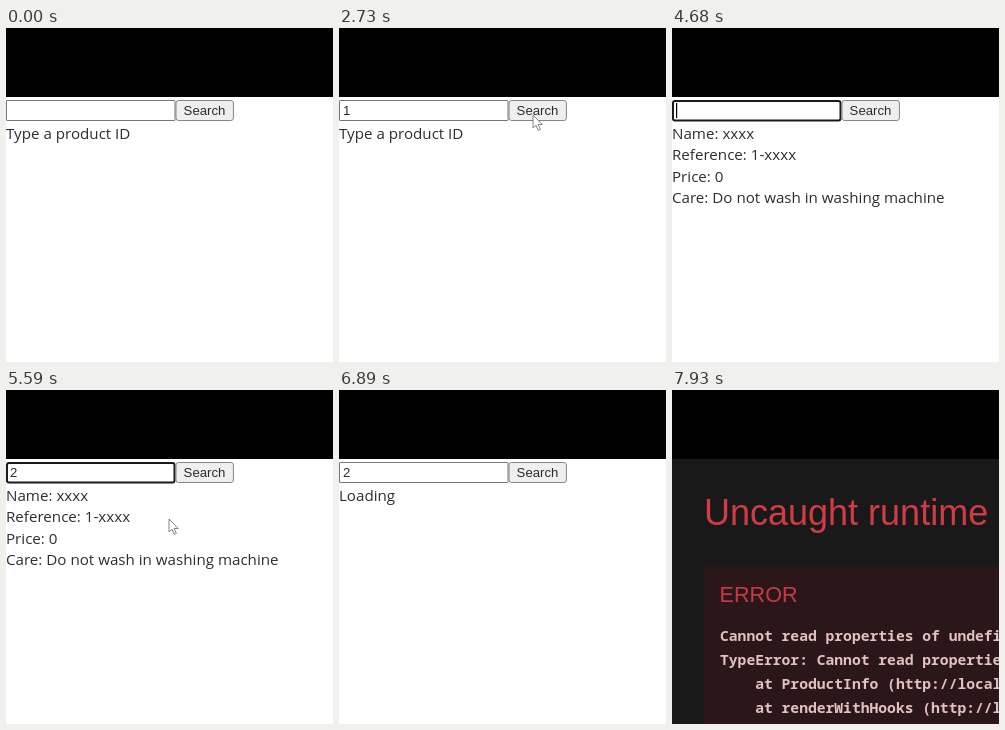
Animation of 327 by 334 pixels, one loop 8000 ms. Source, as an HTML page:

```html
<!DOCTYPE html>
<html lang="en">
<head>
<meta charset="utf-8">
<title>Product search</title>
<style>
  html, body { margin: 0; width: 100%; height: 100%; overflow: hidden; background: #fff; }
  svg { display: block; width: 327px; height: 334px; }
  text { white-space: pre; }
  .body { font: 15.15px "Open Sans", "Noto Sans", sans-serif; fill: #2b2f33; }
  .ui { font: 13.2px "Liberation Sans", Arial, sans-serif; fill: #2c2c2c; }
  .title { font: 36px "Liberation Sans", Arial, sans-serif; fill: #d03c45; }
  .sub { font: 21.6px "Liberation Sans", Arial, sans-serif; fill: #c83a43; }
  .mono { font: 600 14.66px "Noto Sans Mono", "DejaVu Sans Mono", monospace; fill: #e6c0c0; }
</style>
</head>
<body>
<svg viewBox="0 0 327 334">
  <rect width="327" height="334" fill="#fff"/>
  <rect width="327" height="69" fill="#000"/>

  <g id="page">
    <rect id="blurred" x=".5" y="72.5" width="168.5" height="20" rx=".5" fill="#fff" stroke="#767676"/>
    <rect id="focused" x="1" y="73" width="167.5" height="19.5" rx="2" fill="#fff" stroke="#1a1a1a" stroke-width="2"/>
    <text id="value" class="ui" x="4" y="87"></text>
    <rect id="caret" y="75" width="1.2" height="15" fill="#000"/>
    <rect x="170" y="72.5" width="57.4" height="20" rx="2.5" fill="#efefef" stroke="#858585"/>
    <text class="ui" x="177.6" y="87">Search</text>
    <g id="info"></g>
    <path id="pointer" d="M0 0V13L3 10.3L5.1 15.3L7.3 14.4L5.2 9.5H9.2Z"
          fill="#fff" stroke="#777" stroke-width=".9" stroke-linejoin="round"/>
  </g>

  <g id="overlay">
    <rect y="69" width="327" height="265" fill="#191919"/>
    <rect x="32" y="177" width="295" height="157" fill="#2b1719"/>
    <text class="title" x="32" y="134.8">Uncaught runtime errors:</text>
    <text class="sub" x="47.6" y="212.4">ERROR</text>
    <g id="trace"></g>
  </g>
</svg>

<script>
const LOOP = 8000;
const STEP = 130;
const $ = id => document.getElementById(id);

const texts = {
  hint: ["Type a product ID"],
  loading: ["Loading"],
  product: ["Name: xxxx", "Reference: 1-xxxx", "Price: 0",
            "Care: Do not wash in washing machine"],
  trace: ["Cannot read properties of undefined",
          "TypeError: Cannot read properties of undefined",
          "    at ProductInfo (http://localhost:3000/",
          "    at renderWithHooks (http://localhost:3000/"]
};

// What the user and the page do, in ms.
const events = [
  [0, { value: "", focus: false, info: "hint", crashed: false }],
  [1040, { focus: true }],
  [1820, { value: "1" }],
  [2730, { focus: false }],
  [2860, { info: "loading" }],
  [3380, { info: "product" }],
  [4160, { focus: true }],
  [4680, { value: "" }],
  [4940, { value: "2" }],
  [6240, { focus: false }],
  [6370, { info: "loading" }],
  [7020, { crashed: true }]
];

// The pointer glides between a few stops on each visit, then hides.
const rest = { x: 209, y: 115 }, search = { x: 194, y: 87 }, read = { x: 91, y: 139 };
const visits = [
  { end: 1170, stops: [{ t: 130, x: 209, y: 138 }, { t: 260, ...rest },
                       { t: 520, ...rest }, { t: 1040, x: 100, y: 84 }] },
  { end: 4290, stops: [{ t: 2470, x: 158, y: 98 }, { t: 2730, ...search }, { t: 2990, ...search },
                       { t: 3510, ...read }, { t: 3770, ...read }, { t: 4160, x: 50, y: 84 }] },
  { end: 6760, stops: [{ t: 5330, x: 138, y: 96 }, { t: 5590, x: 163, y: 129 },
                       { t: 5850, x: 239, y: 246 }, { t: 6240, ...search }] }
];

const ease = p => p * p * (3 - 2 * p);

function pointerAt(t) {
  const visit = visits.find(v => t >= v.stops[0].t && t < v.end);
  if (!visit) return null;
  const next = visit.stops.findIndex(s => s.t > t);
  if (next < 0) return visit.stops.at(-1);
  const a = visit.stops[next - 1], b = visit.stops[next];
  const p = ease((t - a.t) / (b.t - a.t));
  return { x: a.x + (b.x - a.x) * p, y: a.y + (b.y - a.y) * p };
}

const stateAt = t =>
  Object.assign({}, ...events.filter(([start]) => start <= t).map(([, change]) => change));

const show = (id, on) => { $(id).style.display = on ? "" : "none"; };

function lines(id, key, type, x, y, gap) {
  $(id).innerHTML = texts[key]
    .map((line, i) => `<text class="${type}" x="${x}" y="${y + i * gap}">${line}</text>`)
    .join("");
}

function draw(t) {
  const { value, focus, info, crashed } = stateAt(t);
  const pointer = pointerAt(t);

  show("page", !crashed);
  show("overlay", crashed);
  show("blurred", !focus);
  show("focused", focus);
  show("caret", focus && !pointer);
  show("pointer", pointer);

  $("value").textContent = value;
  $("caret").setAttribute("x", value ? 10.8 : 4);
  if (pointer) $("pointer").setAttribute("transform", `translate(${pointer.x} ${pointer.y})`);
  lines("info", info, "body", 0, 110.6, 21.6);
}

lines("trace", "trace", "mono", 48, 250.7, 24);

const begin = performance.now();
function tick() {
  const t = (performance.now() - begin) % LOOP;
  draw(Math.floor(t / STEP) * STEP);
  requestAnimationFrame(tick);
}
tick();
</script>
</body>
</html>
```
